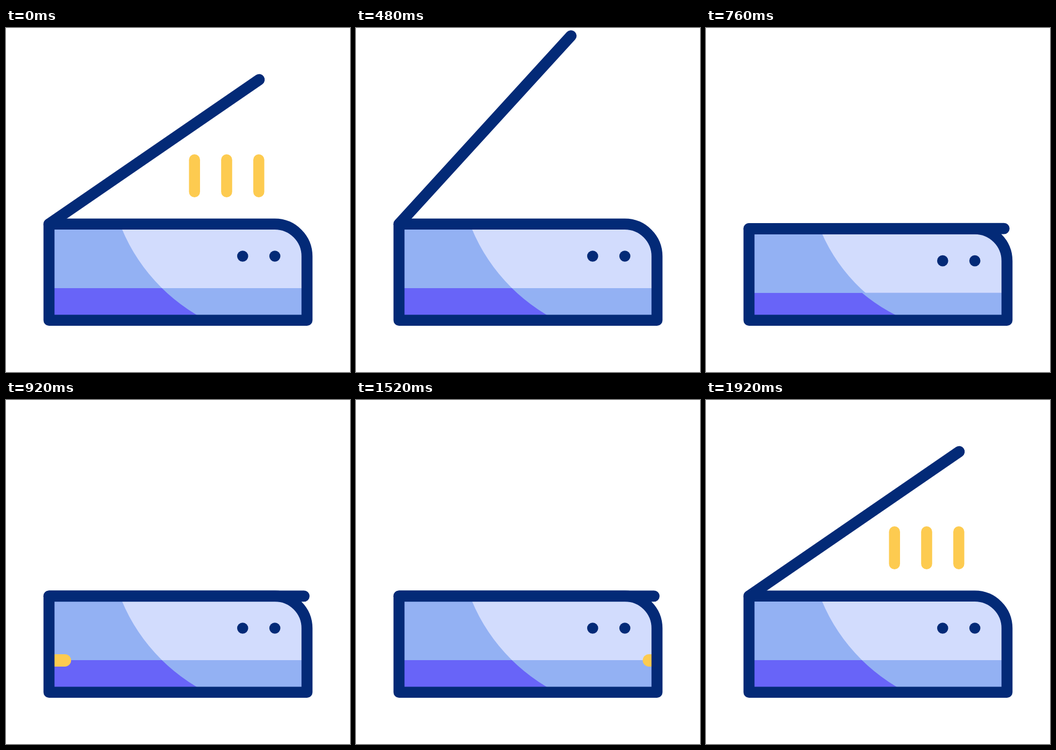
These frames come from a looping animation (640x640 px, 2 s). An HTML page with a canvas:

```html
<!DOCTYPE html>
<html lang="en">
<head>
<meta charset="utf-8">
<title>Scanner</title>
<style>
  html, body { margin: 0; height: 100%; overflow: hidden; background: #fff; }
  canvas { display: block; width: 640px; height: 640px; }
</style>
</head>
<body>
<canvas id="stage" width="640" height="640"></canvas>
<script>
const ctx = document.getElementById('stage').getContext('2d');
const NAVY = '#032a77', LIGHT = '#d2dcfd', MID = '#93b1f3', VIOLET = '#6864f8', YELLOW = '#fdcb50';
const LOOP = 2000, LEFT = 80, RIGHT = 560, TOP = 364.8, BAND = 484, BOTTOM = 543.8;
const LID = 474.4, REST = 34.5, PEAK = 47.6;

// Smooth progress from 0 to 1 between two times
function ease(t, from, to) {
  const x = Math.min(1, Math.max(0, (t - from) / (to - from)));
  return x * x * (3 - 2 * x);
}

function line(x1, y1, x2, y2, color, width) {
  ctx.beginPath();
  ctx.moveTo(x1, y1);
  ctx.lineTo(x2, y2);
  ctx.strokeStyle = color;
  ctx.lineWidth = width;
  ctx.stroke();
}

function disc(x, y, r, color) {
  ctx.beginPath();
  ctx.arc(x, y, r, 0, 7);
  ctx.fillStyle = color;
  ctx.fill();
}

// A strip from a given top down to the base, split by the round highlight
function strip(top, drop, shade, shine) {
  ctx.save();
  ctx.translate(0, BOTTOM);
  ctx.scale(1, (BOTTOM - top - drop) / (BOTTOM - top));
  ctx.translate(0, -BOTTOM);
  ctx.beginPath();
  ctx.rect(LEFT, top, RIGHT - LEFT, BOTTOM - top);
  ctx.clip();
  ctx.fillStyle = shade;
  ctx.fillRect(LEFT, top, RIGHT - LEFT, BOTTOM - top);
  disc(526.5, 243.8, 337, shine);
  ctx.restore();
}

function drawBody(t, drop) {
  const top = TOP + drop;
  const body = new Path2D(`M${LEFT} ${top}H500A60 60 0 0 1 ${RIGHT} ${top + 60}V${BOTTOM}H${LEFT}Z`);
  ctx.save();
  ctx.clip(body);
  strip(TOP, drop, MID, LIGHT);
  strip(BAND, drop, VIOLET, MID);
  const span = RIGHT - LEFT;
  const head = ease(t, 850, 1320), tail = ease(t, 1150, 1565);
  if (head > tail) line(LEFT + span * tail, 484.4, LEFT + span * head, 484.4, YELLOW, 23);
  ctx.restore();

  ctx.strokeStyle = NAVY;
  ctx.lineWidth = 20.5;
  ctx.stroke(body);
  for (const x of [440.3, 500.2]) disc(x, 424.5 + drop, 10.3, NAVY);
}

function drawLid(t, drop) {
  const degrees = t < 1000
    ? REST + (PEAK - REST) * ease(t, 152, 488) - PEAK * ease(t, 488, 766)
    : REST * ease(t, 1560, 1920);
  const a = degrees * Math.PI / 180, y = TOP + drop;
  line(LEFT, y, LEFT + LID * Math.cos(a), y - LID * Math.sin(a), NAVY, 20.8);
}

function drawRays(t) {
  const out = ease(t, 152, 488), grow = ease(t, 1560, 1920);
  let top = 245.3 - 5 * out, bottom = 304.8 - 64.5 * out;
  if (t > 1000) {
    bottom = 304.8;
    top = bottom - 59.5 * grow;
  }
  if (bottom - top < 0.1) return;
  for (const x of [350.7, 410.5, 470.3]) line(x, top, x, bottom, YELLOW, 20.5);
}

function frame(now) {
  const t = now % LOOP;
  const drop = 8.7 * (ease(t, 650, 766) - ease(t, 766, 900));
  ctx.fillStyle = '#fff';
  ctx.fillRect(0, 0, 640, 640);
  ctx.lineCap = ctx.lineJoin = 'round';
  drawRays(t);
  drawBody(t, drop);
  drawLid(t, drop);
  requestAnimationFrame(frame);
}
frame(performance.now());
</script>
</body>
</html>
```
